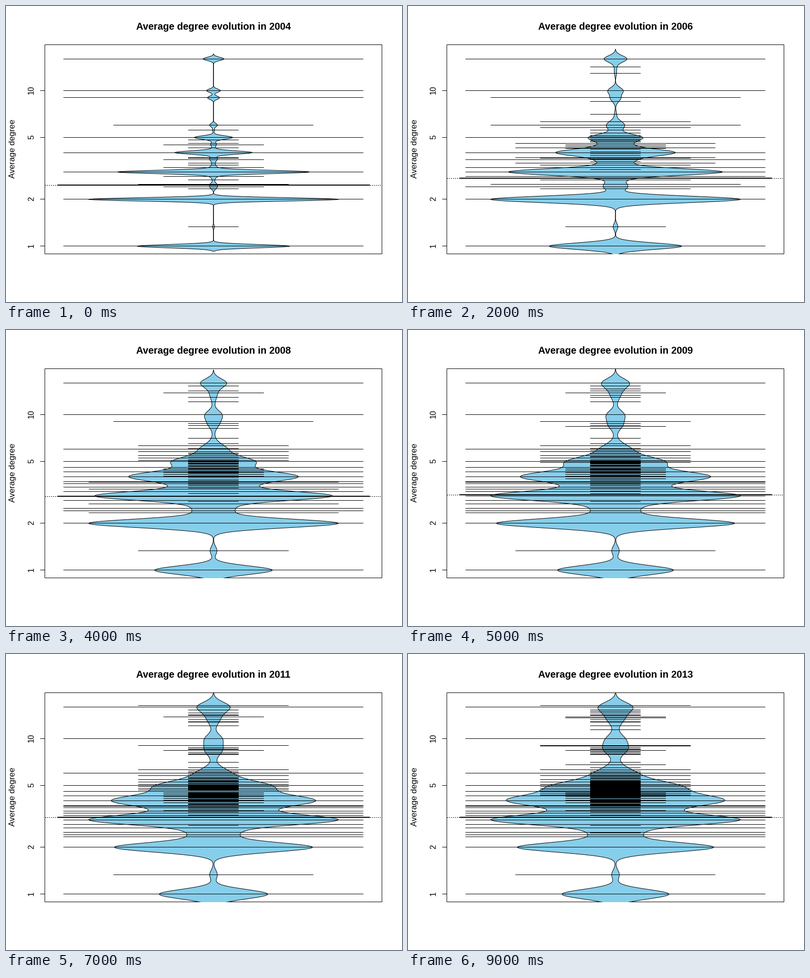
A matplotlib script for the animation above (10 s loop, 800 by 600 pixels).

```python
import numpy as np
import matplotlib.pyplot as plt
from matplotlib.animation import FuncAnimation
from matplotlib.collections import LineCollection
from matplotlib.patches import Polygon, Rectangle

W, H, DPI = 800, 600, 100
PX = 72 / DPI                       # one pixel in points
LEFT, RIGHT, TOP, BOTTOM = 78, 759, 78, 502
CX, UNIT = 419.2, 630.5             # centre and pixels per x unit
FIRST, YEARS = 2004, 10
SANS = "Liberation Sans"
GOLDEN = (5 ** 0.5 - 1) / 2

# Whole degrees: count in the first year, count in the end.
WHOLE = {1: (77, 56), 3: (97, 108), 4: (38, 64), 5: (19, 24), 6: (4, 6),
         9: (6, 3), 10: (7, 8), 16: (10.5, 12.5)}
# Group size: range of degree sums, first and last count.
GROUPS = {3: (4, 6, 1, 4), 4: (10, 12, 3, 7), 5: (12, 20, 2.5, 9),
          6: (14, 24, 1, 6), 7: (24, 34, 1, 8)}
# Clusters of rare values: centre, log spread, first size, growth per year.
CLUSTERS = [(4.55, 0.05, 4, 9.5), (8.4, 0.01, -1, 1), (13.85, 0.025, -1, 1.6)]


def row(degree):
    """Pixel height of a degree on the log axis."""
    return 486.87 - 315.3 * np.log10(degree)


def growth(t):
    return 1 - np.exp(-(t / 3) ** 1.6)


def cluster(centre, spread, size):
    """Evenly filling logistic scatter; some values come more than once."""
    for i in range(1, int(size) + 1):
        u = i * GOLDEN % 1
        yield (centre * 10 ** (spread * np.log(u / (1 - u))),
               1 + (i % 4 == 0) + (i % 8 == 0))


def sample(t):
    """Pairs of degree and count, t years after the first."""
    g = growth(t) ** 0.8
    pairs = [(2, np.interp(t, [4, 7], [126, 102]))]
    pairs += [(d, a + (b - a) * g) for d, (a, b) in WHOLE.items()]
    for n, (lo, hi, a, b) in GROUPS.items():
        pairs += [(m / n, a + (b - a) * g)
                  for m in range(lo, hi, 2) if m % n]
    for centre, spread, size, rate in CLUSTERS:
        pairs += cluster(centre, spread, size + rate * t)
    return np.array(pairs).T


def bean(bandwidth, degrees, n):
    """Outline of the mirrored Gaussian density."""
    at = row(degrees)
    y = np.arange(at.min() - 3 * bandwidth, at.max() + 3 * bandwidth, 0.5)
    density = np.exp(-((y[:, None] - at) / bandwidth) ** 2 / 2) @ n
    half = density * 0.4 * UNIT / density.max()
    return np.column_stack([np.r_[CX - half, (CX + half)[::-1]],
                            np.r_[y, y[::-1]]])


def strips(degrees, n):
    """One line per degree, longer for each repeat up to six."""
    half = 0.08 * UNIT * np.clip(np.round(n), 1, 6)
    y = np.floor(row(degrees)) + 0.5
    x0, x1 = np.floor(CX - half), np.floor(CX + half) + 1
    return [[(a, c), (b, c)] for a, b, c in zip(x0, x1, y)]


fig = plt.figure(figsize=(W / DPI, H / DPI), dpi=DPI, facecolor="white")
ax = fig.add_axes([0, 0, 1, 1])
ax.set(xlim=(0, W), ylim=(H, 0))
ax.axis("off")
# Coordinates sit on pixel centres, so snapping would only shift them.
thin = dict(linewidth=PX, snap=False)

ax.add_patch(Rectangle((LEFT + .5, TOP + .5), RIGHT - LEFT, BOTTOM - TOP,
                       fill=False, edgecolor="black", zorder=1, **thin))
label = dict(rotation=90, rotation_mode="anchor", ha="center", va="baseline",
             family=SANS)
for tick in (1, 2, 5, 10):
    y = np.floor(row(tick)) + 0.5
    ax.plot([LEFT - 9, LEFT + 1], [y, y], color="black", zorder=1,
            solid_capstyle="butt", **thin)
    ax.text(56, y - 1, str(tick), size=16 * PX, **label)
ax.text(18, 289, "Average degree", size=16.8 * PX, **label)
title = ax.text(419, 47.5, "", ha="center", va="baseline", family=SANS,
                weight="bold", size=19.75 * PX)

dots, = ax.plot([], [], color="black", linestyle=(0, (2, 2)), zorder=2,
                dash_capstyle="butt", **thin)
shape = Polygon([(0, 0), (0, 1), (1, 0)], facecolor="skyblue",
                edgecolor="black", joinstyle="round", zorder=3, **thin)
ax.add_patch(shape)
shape.set_clip_path(Rectangle((LEFT, TOP), RIGHT - LEFT + 1, BOTTOM - TOP + 1,
                              transform=ax.transData))
lines = LineCollection([], colors="black", linewidths=PX, capstyle="butt",
                       snap=False, zorder=4)
ax.add_collection(lines, autolim=False)
average, = ax.plot([], [], color="black", linewidth=2 * PX, snap=False,
                   solid_capstyle="butt", zorder=5)


def draw(t):
    degrees, n = sample(t)
    title.set_text(f"Average degree evolution in {FIRST + t}")
    shape.set_xy(bean(3.4 + 6.4 * growth(t) ** 0.8, degrees, n))
    lines.set_segments(strips(degrees, n))
    y = np.floor(row(2.465 + 0.65 * growth(t)))
    dots.set_data([LEFT + 1, RIGHT + 1], [y + .5, y + .5])
    average.set_data([104, 735], [y, y])
    return title, shape, lines, dots, average


anim = FuncAnimation(fig, draw, frames=YEARS, interval=1000, repeat=True,
                     repeat_delay=0, blit=False)
plt.show()
```
